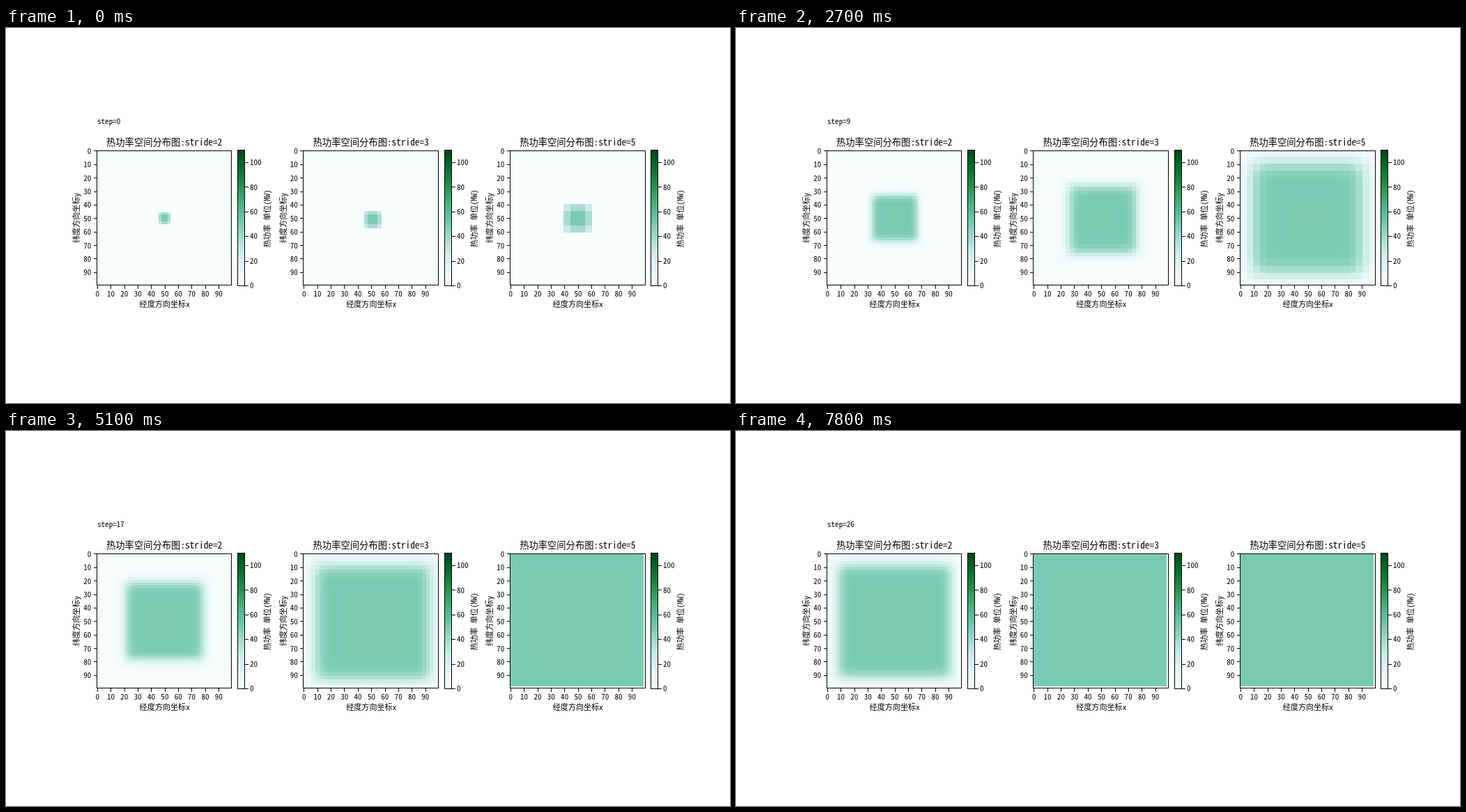
An HTML page with a canvas that plays this animation: 1039x539 px, repeating every 8000 ms.

```html
<!DOCTYPE html>
<html lang="zh">
<head>
<meta charset="utf-8">
<style>
html, body { margin: 0; width: 100%; height: 100%; overflow: hidden; background: #fff; }
canvas, svg { position: absolute; left: 0; top: 0; }
text {
  font: 11.1px "Noto Sans Mono CJK SC", "Noto Sans CJK SC", "Noto Sans CJK", "Noto Sans CJK JP", monospace;
  fill: #000;
  white-space: pre;
}
.title { font-size: 13.3px; }
.line { stroke: #000; stroke-width: 1.1; fill: none; shape-rendering: crispEdges; }
</style>
</head>
<body>
<canvas id="heat" width="1039" height="539"></canvas>
<svg id="chart" width="1039" height="539"></svg>
<script>
const COLORS = ['f7fcfd', 'e5f5f9', 'ccece6', '99d8c9', '66c2a4', '41ae76', '238b45', '006d2c', '00441b'];
const RGB = COLORS.map(c => [0, 2, 4].map(i => parseInt(c.slice(i, i + 2), 16)));
const SIZE = 193.5, CELL = SIZE / 100, TOP = 175.5;
const PEAK = 50, VMAX = 110, SPREAD = 0.75;
const STEP_MS = 300, LOOP_MS = 8000;
const panels = [2, 3, 5].map((stride, i) => ({
  stride,
  left: 129.9 + 296.55 * i,
  center: Math.round(50 / stride) * stride
}));
const ctx = document.getElementById('heat').getContext('2d');
const snap = v => Math.floor(v + 0.5) + 0.5;

function color(value) {
  const p = value / VMAX * 8, i = Math.min(7, Math.floor(p));
  return `rgb(${RGB[i].map((a, c) => Math.round(a + (RGB[i + 1][c] - a) * (p - i)))})`;
}

// Static chart parts
const text = (x, y, str, anchor = 'middle', extra = '') =>
  `<text x="${x}" y="${y}" text-anchor="${anchor}" ${extra}>${str}</text>`;
const upright = (x, y, str) => text(0, 0, str, 'middle', `transform="translate(${x} ${y}) rotate(-90)"`);
const line = d => `<path class="line" d="${d}"/>`;
const box = (l, t, r, b) => line(`M${l} ${t}H${r}V${b}H${l}Z`);

function drawPanel({ left, stride }) {
  const l = snap(left), t = snap(TOP), r = snap(left + SIZE), b = snap(TOP + SIZE);
  const mid = left + SIZE / 2;
  let out = box(l, t, r, b);
  for (let v = 0; v < 100; v += 10) {
    const d = (v + 0.5) * CELL, x = left + d, y = TOP + d;
    out += line(`M${snap(x)} ${b}v5M${l} ${snap(y)}h-5`);
    out += text(x + 0.3, 386, v) + text(left - 7.6, y + 4.6, v, 'end');
  }
  out += text(mid + 0.5, 169, `热功率空间分布图:stride=${stride}`, 'middle', 'class="title"');
  out += text(mid + 1, 401, '经度方向坐标x') + upright(left - 24.8, 273, '纬度方向坐标y');

  const bar = snap(left + 202.4), end = bar + 10;
  out += `<rect x="${bar}" y="175" width="10" height="195" fill="url(#scale)"/>`;
  out += box(bar, 175.5, end, 370.5);
  for (let v = 0; v <= 100; v += 20) {
    const y = 370 - v * 195 / VMAX;
    out += line(`M${end} ${snap(y)}h5`) + text(end + 7.5, y + 4.4, v, 'start');
  }
  return out + upright(left + 249.3, 274, '热功率 单位(MW)');
}

const stops = COLORS.map((c, i) => `<stop offset="${i / 8}" stop-color="#${c}"/>`).join('');
document.getElementById('chart').innerHTML =
  `<linearGradient id="scale" x1="0" y1="1" x2="0" y2="0">${stops}</linearGradient>` +
  panels.map(drawPanel).join('') + text(131, 137.5, '', 'start', 'id="step"');
const label = document.getElementById('step');

// Each round passes a share of the level on to the next ring outwards.
function ringLevels(rounds) {
  const level = Array(60).fill(0);
  level[0] = 1;
  for (let n = 0; n < rounds; n++)
    for (let k = 59; k > 0; k--) level[k] += SPREAD * (level[k - 1] - level[k]);
  return level;
}

function drawHeat({ left, stride, center }, rings) {
  // The last row and column always stay cold.
  const level = Array.from({ length: 100 }, (_, i) =>
    i === 99 ? 0 : rings[Math.max(0, Math.ceil(Math.abs(i - center) / stride) - 1)]);
  const edge = (start, i) => Math.round(start + i * CELL);
  for (let row = 0; row < 100; row++) {
    const y = edge(TOP, row), h = edge(TOP, row + 1) - y;
    for (let col = 0; col < 100; col++) {
      const x = edge(left, col);
      ctx.fillStyle = color(PEAK * level[row] * level[col]);
      ctx.fillRect(x, y, edge(left, col + 1) - x, h);
    }
  }
}

let shown = -1;
function frame() {
  const step = Math.floor(performance.now() % LOOP_MS / STEP_MS);
  if (step !== shown) {
    shown = step;
    label.textContent = `step=${step}`;
    const rings = ringLevels(step + 1);
    panels.forEach(p => drawHeat(p, rings));
  }
  requestAnimationFrame(frame);
}
frame();
</script>
</body>
</html>
```
